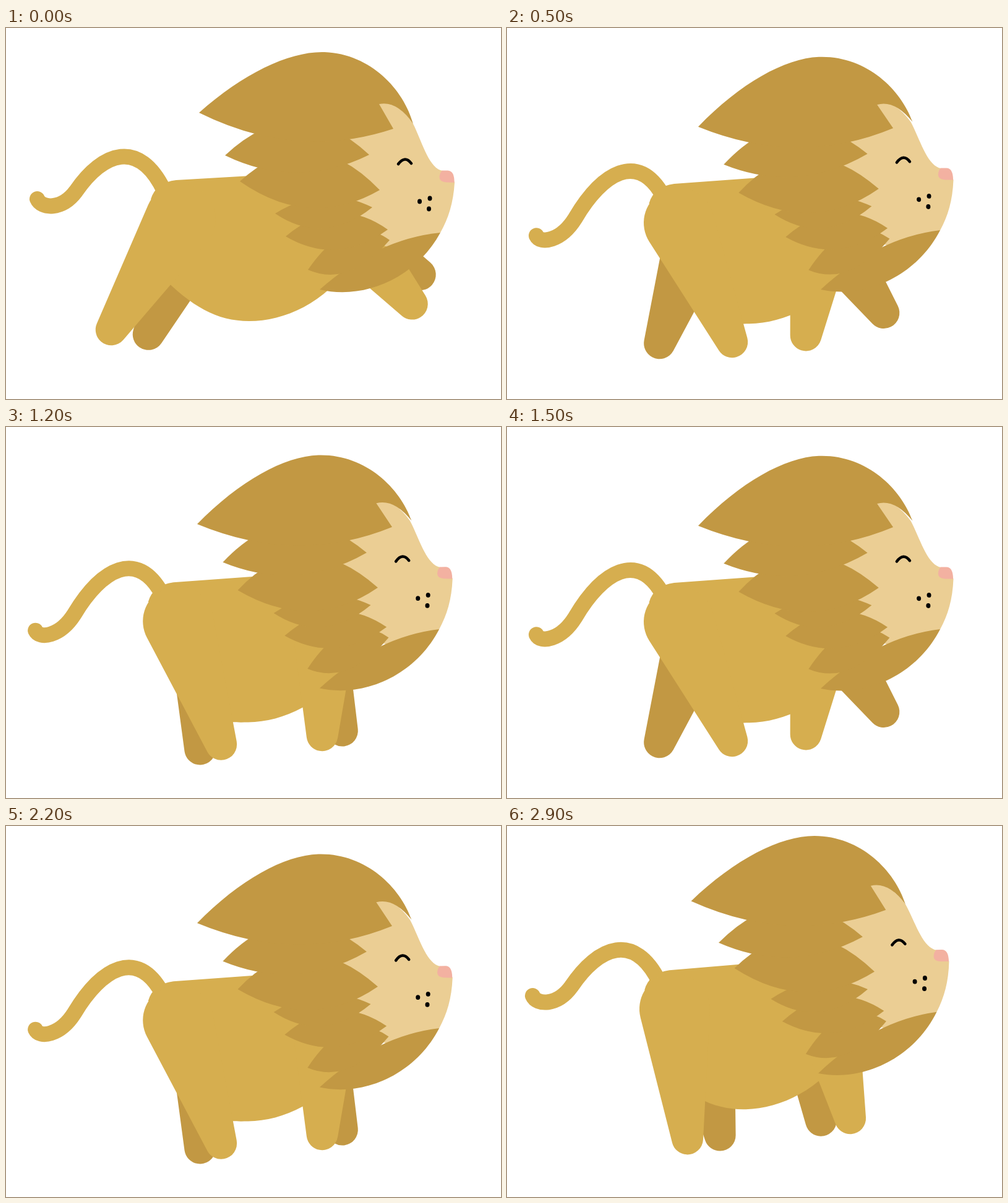
Recreate the animation shown at these times as an HTML page with a canvas. Size 800 by 600 pixels, loop 3000 ms.

```html
<!DOCTYPE html>
<html lang="en">
<head>
<meta charset="utf-8">
<title>Galloping lion</title>
<style>
  html, body { margin: 0; width: 100%; height: 100%; overflow: hidden; background: #fff; }
  canvas { display: block; width: 800px; height: 600px; }
</style>
</head>
<body>
<canvas id="stage" width="800" height="600"></canvas>
<script>
const ctx = document.getElementById('stage').getContext('2d');
const GOLD = '#d6ae4f', BROWN = '#c29843', CREAM = '#ebce94', PINK = '#f3b1a1';
const TAU = 2 * Math.PI;
const STEP = 100, STEPS = 10, STRIDES = 3;
const HIP = [282, 309], SHOULDER = [519, 286], NECK = [507, 423], BROW = [655, 105];
const LEG = { length: 211, thigh: 57, foot: 25.4 };

const topLock = new Path2D(`M312 137C385 72 460 37 515 39C590 42 643 100 658 155
  Q632 117 603 123L626 163Q469 215 312 137Z`);
const face = new Path2D(`M658 155C672 183 682 222 702 230L720 234L725 250
  C723 283 715 308 702 331L640 362L590 345L545 300L545 180L600 120Q632 117 658 155Z`);
const chin = new Path2D('M507 423Q600 341 702 331C662 405 578 440 507 423Z');
const nose = new Path2D(`M705 230.5L714 230.5Q725 231 724.5 250L711 249.5
  Q700 248 700.5 241Q701 234 705 230.5Z`);
const eye = new Path2D('M634 220Q645 205.5 655 219');

const bump = (phase, centre) => Math.exp(-(((phase - centre) / 0.05) ** 2));

function gait(phase) {
  const sin = Math.sin(TAU * phase), cos = Math.cos(TAU * phase);
  const hop = bump(phase, 0.7);
  return {
    hop,
    droop: (1 - cos) / 2 * (1 - hop),
    surge: Math.max(0, sin),
    reach: 50 * bump(phase, 0.1),
    swing: (mean, c, s) => mean + c * cos + s * sin
  };
}

function fill(color, path) {
  ctx.fillStyle = color;
  path ? ctx.fill(path) : ctx.fill();
}

function turn([x, y], angle) {
  ctx.translate(x, y);
  ctx.rotate(angle);
  ctx.translate(-x, -y);
}

function layer(paint) {
  ctx.save();
  paint();
  ctx.restore();
}

// A tapered limb: the hull of a thigh circle and a foot circle.
function drawLeg([x, y], degrees, color) {
  const a = degrees * TAU / 360;
  const spread = Math.acos((LEG.thigh - LEG.foot) / LEG.length);
  ctx.beginPath();
  ctx.arc(x, y, LEG.thigh, a + spread, a - spread + TAU);
  ctx.arc(x + LEG.length * Math.cos(a), y + LEG.length * Math.sin(a),
    LEG.foot, a - spread, a + spread);
  ctx.closePath();
  fill(color);
}

function drawTail({ droop, hop }) {
  const root = 252, sway = 0.245 * droop + 0.04 * hop;
  const at = (x, y) => [x - 3 * droop - 9 * hop,
    y + 10 * droop - 10 * hop + sway * (root - x)];
  ctx.beginPath();
  ctx.moveTo(...at(50.5, 276.5));
  ctx.bezierCurveTo(...at(57, 292), ...at(90, 295), ...at(113, 264));
  ctx.bezierCurveTo(...at(157, 200), ...at(215, 180), ...at(255, 262));
  ctx.strokeStyle = GOLD;
  ctx.lineWidth = 25;
  ctx.lineCap = 'round';
  ctx.stroke();
}

function drawTorso(droop) {
  const endX = 250 + 55 * droop, endY = 400 + 25 * droop;
  ctx.beginPath();
  ctx.moveTo(430, 237);
  ctx.lineTo(275, 246);
  ctx.quadraticCurveTo(242, 250, 234, 277);
  ctx.lineTo(...HIP);
  ctx.lineTo(endX, endY);
  ctx.bezierCurveTo(endX + 50, endY + 50, 340, 474, 393, 474);
  ctx.bezierCurveTo(450, 474, 515, 445, 560, 380);
  ctx.lineTo(560, 300);
  ctx.closePath();
  fill(GOLD);
}

// A lens of hair between two tips, hinged at the face side.
function drawTuft(left, right, rise, sag, angle = 0) {
  const midX = (left[0] + right[0]) / 2, midY = (left[1] + right[1]) / 2;
  layer(() => {
    turn(right, -angle);
    ctx.beginPath();
    ctx.moveTo(...left);
    ctx.quadraticCurveTo(midX, midY - rise, ...right);
    ctx.quadraticCurveTo(midX, midY + sag, ...left);
    fill(BROWN);
  });
}

function drawDot(x, y) {
  ctx.beginPath();
  ctx.ellipse(x, y, 3.5, 3.9, 0, 0, TAU);
  fill('#000');
}

function drawHead({ droop, hop }) {
  ctx.translate(-4 * hop, -23 * hop);
  turn(NECK, -0.02 * droop - 0.037 * hop);
  fill(CREAM, face);
  fill(PINK, nose);
  ctx.strokeStyle = '#000';
  ctx.lineWidth = 4.6;
  ctx.lineCap = 'round';
  ctx.stroke(eye);
  drawDot(668.5, 280.5);
  drawDot(685, 275.5);
  drawDot(683.5, 292.5);

  fill(BROWN, chin);
  drawTuft([488, 391], [620, 343], 72, 53);
  drawTuft([452, 337], [617, 326], 64, 54);
  drawTuft([435, 300], [592, 290], 44, 58);
  drawTuft([378, 248], [604, 262], 110, 72, 0.07 * droop);
  drawTuft([354, 206], [587, 205], 109, 57, 0.05 * droop);
  turn(BROW, -0.055 * droop);
  fill(BROWN, topLock);
}

function draw(time) {
  const step = Math.floor(time / STEP) % STEPS;
  const pose = gait(step * STRIDES % STEPS / STEPS);
  const { droop, hop, surge, reach, swing } = pose;
  const tilt = -0.015 * droop - 0.025 * hop;
  const dx = -4 * droop - 11 * hop, dy = 6 * droop - 13 * hop;

  const joint = ([x, y], offX = 0, offY = 0) => [
    x + dx + offX,
    y + dy + offY + tilt * (x - HIP[0])];

  ctx.fillStyle = '#fff';
  ctx.fillRect(0, 0, 800, 600);
  layer(() => {
    ctx.translate(8 * surge, -5 * surge);
    drawLeg(joint(HIP, 39, -4), swing(112.5, 3, 32.5), BROWN);
    drawLeg(joint(SHOULDER, -28), swing(43.5, -11.2, -37.4), BROWN);
    drawTail(pose);
    layer(() => {
      ctx.translate(dx, dy);
      turn(HIP, tilt);
      drawTorso(droop);
    });
    drawLeg(joint(HIP), swing(94, 28, 1), GOLD);
    drawLeg(joint(SHOULDER), swing(74.5, -24.2, 5) - reach, GOLD);
    layer(() => drawHead(pose));
  });
}

function tick() {
  draw(performance.now());
  requestAnimationFrame(tick);
}
tick();
</script>
</body>
</html>
```
